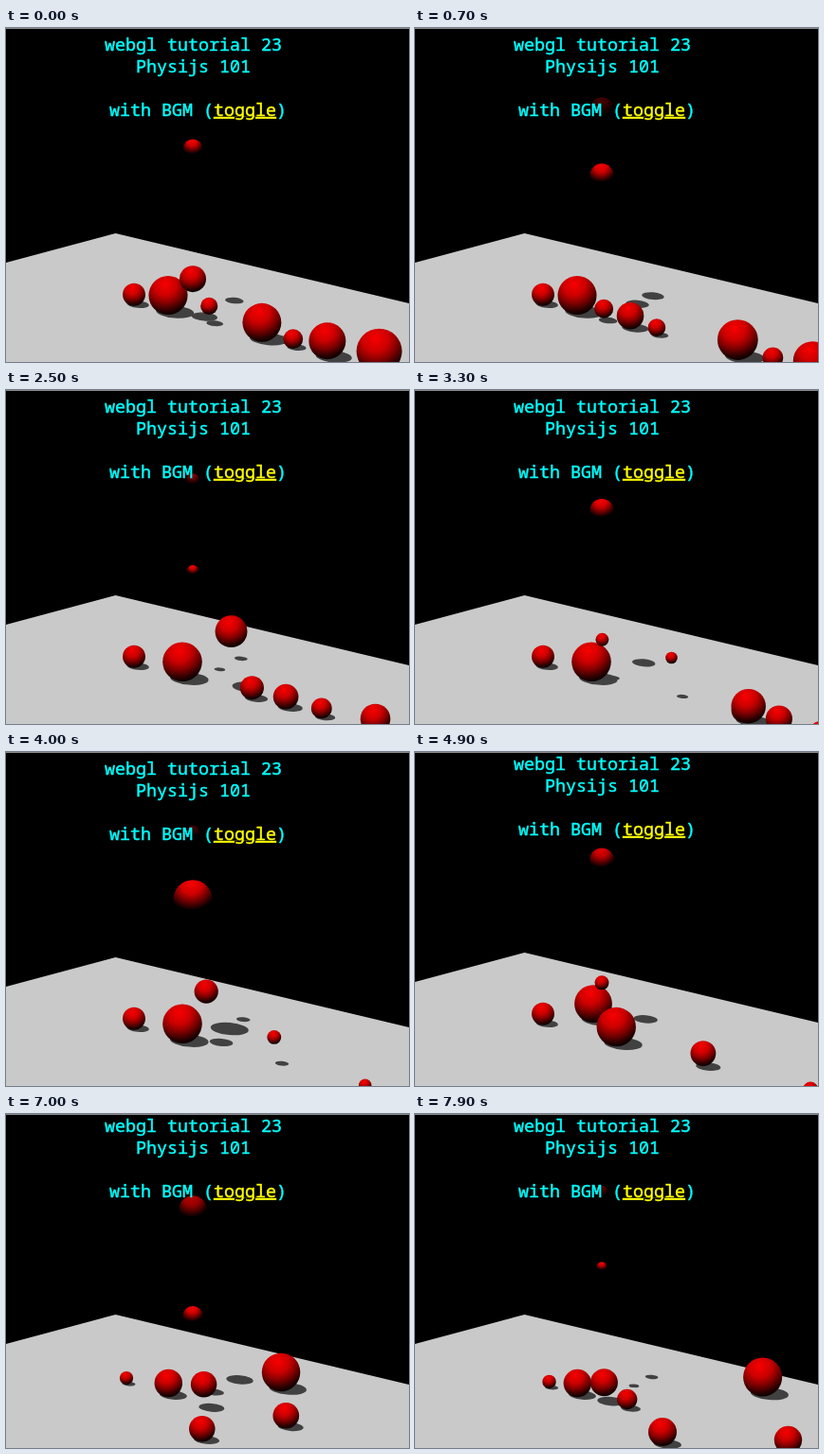
An HTML page that plays this animation: 425x353 px, repeating every 8 s.

```html
<!DOCTYPE html>
<html lang="en">
<head>
<meta charset="utf-8">
<title>webgl tutorial 23</title>
<style>
html, body { margin: 0; width: 100%; height: 100%; overflow: hidden; background: #000; }
svg { display: block; width: 425px; height: 353px; }
text { font: 18.33px "Noto Sans Mono", "DejaVu Sans Mono", monospace; fill: #0ff; stroke: #0ff; stroke-width: .45px; white-space: pre; }
.link { fill: #ff0; stroke: #ff0; text-decoration: underline; }
</style>
</head>
<body>
<svg viewBox="0 0 425 353">
  <defs>
    <radialGradient id="low" cx=".42" cy=".22" r=".8">
      <stop offset="0" stop-color="#f80000"/>
      <stop offset=".36" stop-color="#cc0000"/>
      <stop offset=".6" stop-color="#840000"/>
      <stop offset=".85" stop-color="#2a0000"/>
      <stop offset="1" stop-color="#060000"/>
    </radialGradient>
    <radialGradient id="high" cx=".46" cy=".08" r=".8">
      <stop offset="0" stop-color="#f80000"/>
      <stop offset=".35" stop-color="#d00000"/>
      <stop offset=".6" stop-color="#700000"/>
      <stop offset=".88" stop-color="#000"/>
    </radialGradient>
  </defs>
  <rect width="425" height="353"/>
  <g id="page">
    <path d="M0 248L115.500 217L425 291V370H0Z" fill="#c9c9c9"/>
    <g id="shadows" fill="#414141"></g>
    <g id="balls"></g>
    <text x="104" y="24">webgl tutorial 23</text>
    <text x="137" y="47">Physijs 101</text>
    <text x="109" y="93">with BGM (<tspan class="link">toggle</tspan>)</text>
  </g>
  <rect width="425" height="1" fill="#8a8a8a"/>
</svg>
<script>
const LOOP = 8000, STEP = 100, SCROLL_AT = 4100;
const DROP_X = 197, DROP_Y = 82, GROUND = 309;
const SPAWN_EVERY = 550, FIRST = -8;
const GRAVITY = 0.01236 ** 2, BOUNCE = 0.26;
const PULL = 1.7e-5, DRIFT = 0.27;   // acceleration and direction down the tilted floor

const byId = id => document.getElementById(id);
const clamp = v => Math.max(0, Math.min(1, v));
const ramp = (t, from, to) => clamp((t - from) / (to - from));

function roll(dt, { push = 0, pull = PULL, drift = DRIFT }) {
  const x = dt > 0 ? push * dt + pull * dt * dt : 0;
  return { x, g: x * drift };
}

function bounceHeight(dt, h, v, bounce) {
  for (let i = 0; i < 4; i++) {
    const impact = Math.sqrt(v * v + 4 * GRAVITY * h);
    const air = (v + impact) / (2 * GRAVITY);
    if (dt < air) return h + v * dt - GRAVITY * dt * dt;
    dt -= air;
    h = 0;
    v = bounce * impact;
  }
  return 0;
}

// A ball falls, bounces off the floor (or off the big ball at height `hit`), then rolls away.
function dropped(index, size, push, { hit = 0, bounce = BOUNCE, ...slope } = {}) {
  const born = 5 + (FIRST + index) * SPAWN_EVERY;
  const drop = GROUND - 0.85 * size - DROP_Y - hit;
  const land = born + Math.sqrt(drop / GRAVITY);
  const rebound = bounce * 2 * Math.sqrt(GRAVITY * drop);
  return {
    size, born,
    place(t) {
      if (t < land) return { x: DROP_X, g: GROUND, h: drop + hit - GRAVITY * (t - born) ** 2 };
      const way = roll(t - land, { push, ...slope });
      return { x: DROP_X + way.x, g: GROUND + way.g, h: bounceHeight(t - land, hit, rebound, bounce) };
    }
  };
}

// A ball lies still until it is knocked loose; `nudge` shifts it before that.
function resting(size, x, g, loose, slope, nudge = () => ({ x: 0, g: 0 })) {
  return {
    size, born: -Infinity,
    place(t) {
      const way = roll(t - loose, slope), n = nudge(t);
      return { x: x + n.x + way.x, g: g + n.g + way.g, h: 0 };
    }
  };
}

const onBall = { hit: 39 };
const drops = [
  [9, 0.018], [21.2, 0.028], [17.8, 0.031], [9.7, 0.042], [19.5, 0.054],
  [9, 0.031], [14, 0.039], [10, 0.042], [12.5, 0.053], [12, 0.07],
  [16.5, 0.118, onBall], [6, 0.124, onBall], [7, 0.11, onBall], [12.5, 0.082, onBall],
  [20.5, -0.008, { ...onBall, bounce: 0, pull: 6.75e-5 }],
  [7.5, -0.069, onBall], [13, 0.046], [15, -0.0445], [13.5, 0.0325, { drift: 0.7 }],
  [10.5, 0.03], [14.5, 0.02], [5.5, 0], [7, 0]
];

const balls = [
  resting(21, 171, 300, 4945, { push: 0.025, pull: 1.2e-5, drift: 0.07 }, t => {
    const first = ramp(t, 2170, 2500), second = ramp(t, 4350, 4900);
    return { x: 15 * first + 2 * second, g: 5 * first - 17 * second };
  }),
  resting(12.5, 135, 292, 4945, { drift: 0.8 }),
  ...drops.map((spec, i) => dropped(i, ...spec))
];

function pose(ball, t) {
  const p = ball.place(t);
  p.r = ball.size * (1 + 0.0025 * (p.g - GROUND));
  p.y = p.g - 0.85 * p.r - p.h;
  p.sx = p.x + 0.35 * p.r + 0.233 * p.h;
  p.sy = p.g - 0.121 * p.h;
  return p;
}

const ellipse = (x, y, rx, ry, extra) =>
  `<ellipse cx="${x.toFixed(2)}" cy="${y.toFixed(2)}" rx="${rx.toFixed(2)}" ry="${ry.toFixed(2)}" ${extra}/>`;

const drawShadow = p => ellipse(p.sx, p.sy, p.r * 0.98, p.r * 0.32,
  `transform="rotate(5 ${p.sx.toFixed(2)} ${p.sy.toFixed(2)})"`);

function drawBall(p, all) {
  const high = p.h > 60;
  const light = high ? Math.sqrt(clamp((p.y - DROP_Y) / 45)) : 1;
  let out = ellipse(p.x, p.y, p.r, p.r, `fill="url(#${high ? "high" : "low"})" opacity="${light.toFixed(2)}"`);
  const caster = all.find(c => c.h > 60 && p.h < 5 && p.r > 15 &&
    Math.abs(p.x - c.sx) < 0.7 * p.r && Math.abs(p.g - c.sy) < 8);
  if (caster) {
    out += ellipse(p.x, p.y, p.r, p.r, 'opacity=".3"');
    out += ellipse(caster.sx - 7, caster.sy - 1.35 * p.r, caster.r * 0.85, caster.r * 0.68, 'fill="#380000"');
  }
  return out;
}

function draw(t) {
  const all = balls.filter(b => t >= b.born).map(b => pose(b, t)).sort((a, b) => a.g - b.g);
  byId("page").setAttribute("transform", `translate(0 ${t < SCROLL_AT ? 0 : -5})`);
  byId("shadows").innerHTML = all.map(drawShadow).join("");
  byId("balls").innerHTML = all.map(p => drawBall(p, all)).join("");
}

const start = performance.now();
let shown = -1;
function tick() {
  const t = Math.floor(((performance.now() - start) % LOOP) / STEP) * STEP;
  if (t !== shown) draw(shown = t);
  requestAnimationFrame(tick);
}
tick();
</script>
</body>
</html>
```
